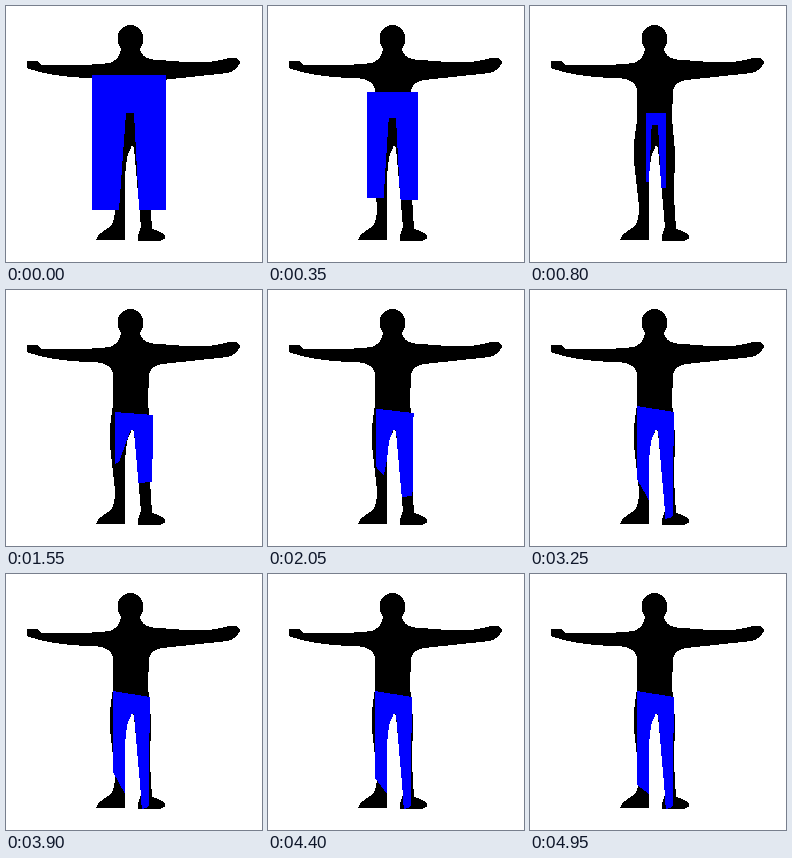
An HTML page that plays this animation: 256 px wide and 256 px high, repeating every 5000 ms.

```html
<!DOCTYPE html>
<html lang="en">
<head>
<meta charset="utf-8">
<title>Trousers fitting</title>
<style>
  html, body { margin: 0; width: 100%; height: 100%; overflow: hidden; background: #fff; }
  svg { display: block; width: 100vw; height: 100vh; shape-rendering: crispEdges; }
  #pants { fill: #00f; }
  .gap { fill: #fff; }
</style>
</head>
<body>
<svg viewBox="0 0 256 256">
  <ellipse cx="124.5" cy="33" rx="13" ry="14"/>
  <!-- left arm and side, feet, right side and arm -->
  <path d="M115 42 Q115 52 104 57 Q80 60 35 59 L31 55 H21 V62 Q45 71 85 72
    Q105 72 107 84 V115 Q103 135 104 155 L109 200 Q109 217 104 221 Q91 228 90 234 H119
    L132 235 H154 Q161 233 159 229 Q156 226 146 223 L144 190 L145 145
    L142 112 L143 85 Q144 76 156 74 L222 67 Q230 65 234 57 Q233 50 223 52
    Q203 58 180 56 L153 54 Q135 54 134 42 Z"/>
  <polygon id="pants"/>
  <path class="gap" d="M126 139 L121 151 L119 170 V236 H132 V230 L135 221 L128 142 Z"/>
</svg>
<script>
  const LOOP = 5000, STEP = 50;

  // Loose trousers shrink inside the body, then grow to fit the legs.
  const loose = { left: 86, right: 160, top: 69, tilt: 0, crotch: 107, cuffX: 113, cuffL: 204, slant: 0, cuffR: 204 };
  const tiny = { left: 116, right: 136, top: 107, tilt: 0, crotch: 119, cuffX: 119, cuffL: 176, slant: 0, cuffR: 182 };
  const short = { left: 109, right: 147, top: 122, tilt: 3, crotch: 140, cuffX: 113, cuffL: 172, slant: -2, cuffR: 192 };
  const long = { left: 107, right: 144, top: 115, tilt: 6, crotch: 140, cuffX: 119, cuffL: 201, slant: 21, cuffR: 221 };
  const longer = { ...long, top: 117, cuffL: 220, slant: 22, cuffR: 233 };
  const fitted = { ...longer, slant: 9 };
  const keys = [[0, loose], [800, tiny], [1550, short], [2600, long], [3900, longer], [4950, fitted]];

  const pants = document.getElementById("pants");

  // The right inseam is a fixed line along the leg.
  const inseam = y => 127.5 + (y - 142) * 0.09;

  function outline(p) {
    const inner = p.cuffR + p.tilt * 0.35;
    return [
      [p.left, p.top], [p.right, p.top + p.tilt],
      [p.right - p.tilt * 0.25, p.cuffR], [inseam(inner), inner],
      [128, p.crotch], [125 - (142 - p.crotch) / 7, p.crotch],
      [p.cuffX, p.cuffL], [p.left, p.cuffL - p.slant]
    ];
  }

  function poseAt(t) {
    const i = Math.max(1, keys.findIndex(([time]) => time >= t));
    const [t0, a] = keys[i - 1], [t1, b] = keys[i];
    const u = (t - t0) / (t1 - t0);
    const pose = {};
    for (const k in a) pose[k] = a[k] + (b[k] - a[k]) * u;
    return pose;
  }

  function draw() {
    const t = Math.floor(performance.now() % LOOP / STEP) * STEP;
    pants.setAttribute("points", outline(poseAt(t)).join(" "));
    requestAnimationFrame(draw);
  }
  draw();
</script>
</body>
</html>
```
